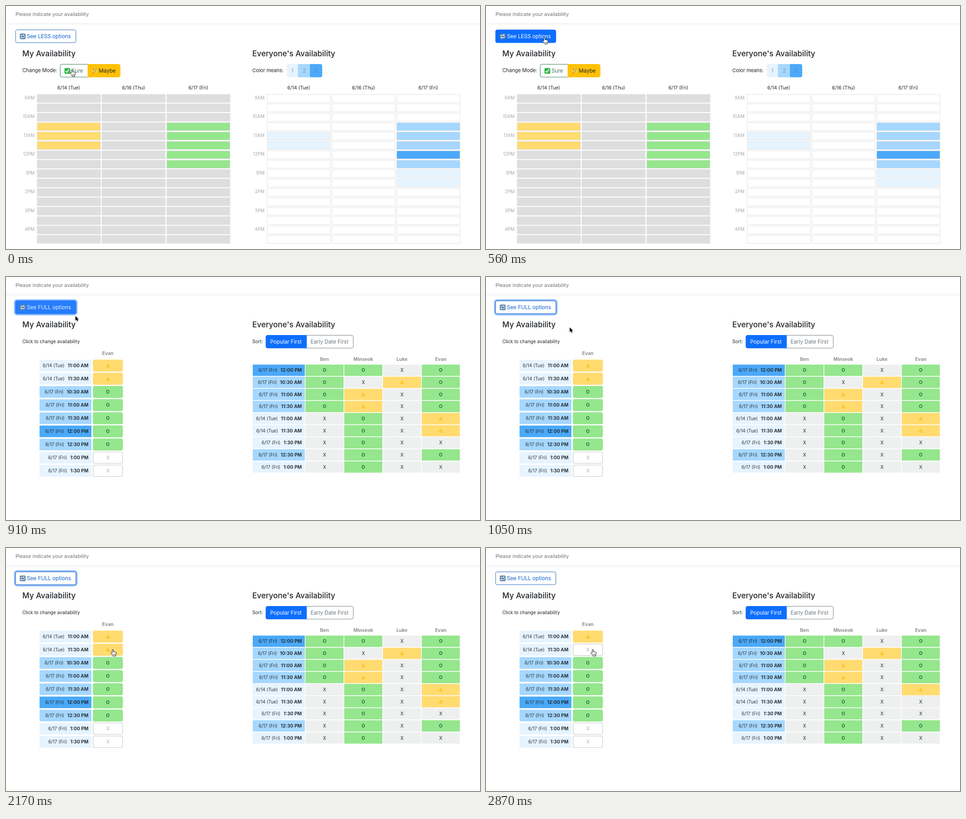
An HTML page that plays this animation: 1045x536 px, repeating every 3080 ms.

```html
<!DOCTYPE html>
<html lang="en">
<head>
<meta charset="utf-8">
<title>Availability</title>
<style>
  html, body { margin: 0; width: 100%; height: 100%; overflow: hidden; background: #fff; }
  svg { display: block; width: 100%; height: 100%; }
  text { font-family: Inter, Roboto, sans-serif; font-optical-sizing: none; fill: #212529; white-space: pre; }
  .mid { text-anchor: middle; }
  .end { text-anchor: end; }
  .bold { font-weight: 700; }
</style>
</head>
<body>
<svg id="stage" viewBox="0 0 1045 536"></svg>
<script>
const LOOP = 3080, STEP = 70;
const BLUE = '#0d6efd', YELLOW = '#ffdb70', GREEN = '#95e68d';
const LEVELS = ['#fff', '#e6f4ff', '#a5d7ff', '#4ba9f9'];
const DAYS = ['6/14 (Tue)', '6/16 (Thu)', '6/17 (Fri)'];
const ME = 'Evan', PEOPLE = ['Ben', 'Minseok', 'Luke', ME];

const rect = (x, y, w, h, fill, extra = '') =>
  `<rect x="${x}" y="${y}" width="${w}" height="${h}" fill="${fill}" ${extra}/>`;
const text = (x, y, size, content, extra = '') =>
  `<text x="${x}" y="${y}" font-size="${size}" ${extra}>${content}</text>`;
const group = (id, content) => `<g id="${id}">${content}</g>`;
const times = (n, make) => Array.from({ length: n }, (_, i) => make(i)).join('');

// Button half: rounded on the left or on the right only.
function halfButton(x, w, side, fill, stroke) {
  const y = 128.6, h = 28.2, r = 3.5;
  const d = side === 'left'
    ? `M${x + w} ${y}H${x + r}q${-r} 0 ${-r} ${r}v${h - 2 * r}q0 ${r} ${r} ${r}H${x + w}Z`
    : `M${x} ${y}H${x + w - r}q${r} 0 ${r} ${r}v${h - 2 * r}q0 ${r} ${-r} ${r}H${x}Z`;
  return `<path d="${d}" fill="${fill}" stroke="${stroke}"/>`;
}

const checkIcon = rect(129, 136.8, 12.6, 12.6, '#2fb344', 'rx="2.2"') +
  '<path d="M131.7 143.4l2.6 2.9 4.6-7" fill="none" stroke="#fff" stroke-width="1.8"/>';
const thinkingIcon = `<circle cx="195.5" cy="142.8" r="6" fill="#fdcf48"/>
  <circle cx="193.3" cy="141.2" r=".9" fill="#6b4514"/><circle cx="197.9" cy="141.2" r=".9" fill="#6b4514"/>
  <path d="M191.7 138.9q1.5-.9 2.7-.2M196.6 138.2q1.7-1 3 .3M194 145.4q2-1 4-.4" fill="none" stroke="#6b4514" stroke-width=".8"/>
  <path d="M190.8 149.2q-.6-3 1.6-3.4l4.2-.5q.8.8-2 1.4 1.6 2.7-1 3Z" fill="#ef9c1c"/>`;
const repeatIcon = rect(30.5, 60.8, 12.6, 12.4, '#587fa5', 'rx="2.4"') +
  `<path d="M32.9 67v-1q0-1.7 1.7-1.7h4.6M40.7 67v1q0 1.7-1.7 1.7h-4.6" fill="none" stroke="#fff" stroke-width="1.3"/>
   <path d="M38.4 62.2l3 2.1-3 2.1ZM35.2 67.6l-3 2.1 3 2.1Z" fill="#fff"/>`;

// Calendar grid; shade(col, row) gives the fill of a slot.
function grid(left, stroke, shade) {
  const hours = ['9AM', '10AM', '11AM', '12PM', '1PM', '2PM', '3PM', '4PM'];
  return DAYS.map((day, col) => {
    const x = left + 142.8 * col;
    return text(x + 70.2, 183.7, 10.5, day, 'class="mid"') + times(16, row =>
      rect(x + .5, 195 + 20.72 * row, 139.6, 17.8, shade(col, row), `stroke="${stroke}"`));
  }).join('') + hours.map((hour, i) =>
    text(left - 5.3, 205.8 + 41.45 * i, 9.9, hour, 'class="end" style="fill:#a8a8a8"')).join('');
}

function myShade(col, row) {
  if (col === 0 && row >= 3 && row <= 5) return YELLOW;
  if (col === 2 && row >= 3 && row <= 7) return GREEN;
  return '#dedede';
}

function everyoneShade(col, row) {
  if (col === 0) return LEVELS[row === 4 || row === 5 ? 1 : 0];
  return LEVELS[col === 2 ? +('0002223211'[row] || 0) : 0];
}

const fullView =
  text(36, 146, 11.1, 'Change Mode:') +
  halfButton(119.5, 61, 'left', '#fff', '#39795c') + checkIcon +
  text(144.6, 147.2, 11.6, 'Sure', 'style="fill:#45735e"') +
  halfButton(180.5, 71.2, 'right', '#ffc107', '#ffc107') + thinkingIcon +
  text(204.6, 147.2, 11.6, 'Maybe') +
  text(543, 146, 11, 'Color means:') +
  halfButton(619.7, 24.5, 'left', LEVELS[1], LEVELS[1]) +
  halfButton(670.5, 26.2, 'right', LEVELS[3], LEVELS[3]) +
  rect(643.7, 128.1, 26.5, 29.2, LEVELS[2]) +
  [1, 2, 3].map((n, i) =>
    text(631.4 + 26.1 * i, 147.2, 11.6, n, 'class="mid" style="fill:#6c757d" opacity=".7"')).join('') +
  grid(68.2, '#e0e0e0', myShade) + grid(575.2, '#e2e2e2', everyoneShade);

// One answer: O (yes), T (maybe) or X (no).
function mark(kind, cx, cy, noColor) {
  if (kind === 'T')
    return `<path d="M${cx} ${cy - 2.8}l3 5.8h-6Z" fill="none" stroke="#fbb905" stroke-width="1.3"/>`;
  const color = kind === 'O' ? '#16783f' : noColor;
  return text(cx, cy + 3.7, 10.2, kind, `class="mid bold" style="fill:${color}"`);
}

function slotLabel(x, w, cy, h, slot, level) {
  const [day, time] = slot;
  return rect(x, cy - h / 2, w, h, LEVELS[level]) +
    text(x + w - 6.6, cy + 3.7, 10, `${DAYS[day]}<tspan dx="7" class="bold" font-size="10.3">${time}</tspan>`,
      'class="end" opacity=".92"');
}

function myCell(kind, row) {
  const cy = 195.5 + 29 * row;
  const fill = { O: GREEN, T: YELLOW, X: '#fff' }[kind];
  const stroke = kind === 'X' ? '#d2d2d2' : fill;
  return rect(192.2, cy - 12.6, 64.8, 25.2, fill, `rx="3" stroke="${stroke}" stroke-width="1.4"`) +
    mark(kind, 224.4, cy, '#c6c6c6');
}

function everyoneCell(kind, row, col) {
  const x = 660.2 + 85.45 * col, cy = 205.7 + 26.67 * row;
  const fill = { O: GREEN, T: YELLOW, X: '#eef0f0' }[kind];
  return rect(x, cy - 12.5, 84, 25, fill) + mark(kind, x + 42, cy, '#686868');
}

const name = (x, y, value) => text(x, y, 10.4, value, 'class="mid bold" style="fill:#8d9093"');

const mySlots = [
  [0, '11:00 AM', 1, 'T'], [0, '11:30 AM', 1, 'T'], [2, '10:30 AM', 2, 'O'],
  [2, '11:00 AM', 2, 'O'], [2, '11:30 AM', 2, 'O'], [2, '12:00 PM', 3, 'O'],
  [2, '12:30 PM', 2, 'O'], [2, '1:00 PM', 1, 'X'], [2, '1:30 PM', 1, 'X']
];
const everyoneSlots = [
  [2, '12:00 PM', 3, 'OOXO'], [2, '10:30 AM', 2, 'OXTO'], [2, '11:00 AM', 2, 'OTXO'],
  [2, '11:30 AM', 2, 'OTXO'], [0, '11:00 AM', 1, 'XOXT'], [0, '11:30 AM', 1, 'XOXT'],
  [2, '1:30 PM', 1, 'XOXX'], [2, '12:30 PM', 2, 'XOXO'], [2, '1:00 PM', 1, 'XOXX']
];

const lessView =
  text(36, 146.3, 10.1, 'Click to change availability') +
  text(543, 146, 10.3, 'Sort:') +
  halfButton(662.5, 103, 'right', '#fff', '#7b8288') +
  halfButton(573, 89.5, 'left', BLUE, BLUE) +
  text(582.5, 147.2, 11.65, 'Popular First', 'style="fill:#fff"') +
  text(671.5, 147.2, 11.65, 'Early Date First', 'style="fill:#6c757d"') +
  name(224.5, 172, ME) +
  mySlots.map((slot, row) =>
    slotLabel(74, 114.5, 195.5 + 29 * row, 25.6, slot, slot[2]) + myCell(slot[3], row)).join('') +
  group('myChange', myCell('X', 1)) +
  PEOPLE.map((person, col) => name(702.2 + 85.45 * col, 184.8, person)).join('') +
  everyoneSlots.map((slot, row) =>
    slotLabel(544, 114.8, 205.7 + 26.67 * row, 25, slot, slot[2]) +
    [...slot[3]].map((kind, col) => everyoneCell(kind, row, col)).join('')).join('') +
  group('everyoneChange', everyoneCell('X', 5, 3));

const toggleButton =
  rect(0, 0, 0, 0, BLUE, 'id="ring"') +
  rect(21.2, 52.7, 132.8, 28.2, '#fff', 'id="toggle" rx="3.5"') +
  repeatIcon + text(46, 71.3, 11.7, '', 'id="toggleText"');

// Each cursor has its hot spot at 0,0.
const cursors = {
  hand: `<path d="M-1.4 7.6V1.1a1.3 1.3 0 0 1 2.6 0V5.2a1.2 1.2 0 0 1 2.2.4 1.2 1.2 0 0 1 2.2.5 1.1 1.1 0 0 1 1.9.8V9.7L6.2 12V14.3H.2V12.9L-3.9 8.6a1.2 1.2 0 0 1 1.8-1.6Z" fill="#fff" stroke="#111" stroke-linejoin="round"/>
    <path d="M1.4 9.2v3M3.2 9.2v3M5 9.2v3" stroke="#333" stroke-width=".7"/>`,
  arrow: '<path d="M0 0V10.6L2.5 8.3 4.2 12 6 11.2 4.4 7.6H7.6Z" fill="#000" stroke="#fff" stroke-width=".9" paint-order="stroke"/>',
  beam: '<path d="M-2.6-6Q0-6 0-4.4 0-6 2.6-6M0-4.6V4.6M-2.6 6Q0 6 0 4.4 0 6 2.6 6M-1.3 2.4H1.3" fill="none" stroke="#111" stroke-width="1.2"/>'
};

// Time, x, y and shape of the pointer.
const path = [
  [0, 145.5, 140.5, 'hand'], [70, 145, 134, 'hand'], [140, 141, 117, 'arrow'], [210, 137, 97, 'beam'],
  [280, 133, 72, 'hand'], [350, 130, 51, 'hand'], [420, 128, 47, 'hand'], [490, 128, 62, 'hand'],
  [560, 129, 69.5, 'hand'], [770, 129, 69.5, 'hand'], [840, 138, 76, 'hand'], [910, 153, 86, 'arrow'],
  [1050, 184.5, 111, 'arrow'], [1120, 194, 123, 'arrow'], [1330, 212, 146, 'arrow'], [1470, 224, 161, 'beam'],
  [1540, 228, 168, 'beam'], [1610, 230, 182, 'hand'], [1680, 232.5, 191, 'hand'], [1890, 238, 210, 'hand'],
  [2030, 238, 221, 'hand'], [2170, 235.5, 224, 'hand'], [LOOP, 235.5, 224, 'hand']
];

document.getElementById('stage').innerHTML =
  text(21, 21.8, 10.95, 'Please indicate your availability', 'style="fill:#6c6f72"') +
  rect(0, 39, 1045, 1, '#e2e4e6') + toggleButton +
  text(36, 111.2, 17, 'My Availability', 'font-weight="500"') +
  text(543, 111.2, 17, 'Everyone\'s Availability', 'font-weight="500"') +
  group('fullView', fullView) + group('lessView', lessView) +
  group('pointer', Object.entries(cursors).map(([id, shape]) => group(id, shape)).join(''));

const el = id => document.getElementById(id);
const set = (id, attributes) => {
  for (const key in attributes) el(id).setAttribute(key, attributes[key]);
};
const show = (id, visible) => set(id, { display: visible ? 'inline' : 'none' });
const ramp = (t, start) => {
  const p = Math.min(1, Math.max(0, (t - start) / 150));
  return p * p * (3 - 2 * p);
};
const mix = (from, to, p) => `rgb(${from.map((v, i) => Math.round(v + (to[i] - v) * p))})`;

function draw(t) {
  const less = t >= 630;
  show('fullView', !less);
  show('lessView', less);
  set('myChange', { opacity: ramp(t, 2620) });
  show('everyoneChange', t >= 2660);

  const hover = ramp(t, 245) - ramp(t, 880);
  const blue = [13, 110, 253];
  set('toggle', { fill: mix([255, 255, 255], blue, hover), stroke: mix([38, 104, 181], blue, hover) });
  el('toggleText').style.fill = mix([11, 99, 206], [255, 255, 255], hover);
  el('toggleText').textContent = `See ${less ? 'FULL' : 'LESS'} options`;

  const focus = ramp(t, 520) - ramp(t, 2630), spread = 3 * focus;
  set('ring', {
    x: 20.7 - spread, y: 52.2 - spread, width: 133.8 + 2 * spread, height: 29.2 + 2 * spread,
    rx: 4 + spread, opacity: .5 * focus
  });

  const next = path.findIndex(key => key[0] > t);
  const [t0, x0, y0, shape] = path[next - 1], [t1, x1, y1] = path[next];
  const p = (t - t0) / (t1 - t0);
  set('pointer', { transform: `translate(${x0 + (x1 - x0) * p} ${y0 + (y1 - y0) * p})` });
  for (const id in cursors) show(id, id === shape);
}

const start = performance.now();
function tick() {
  const t = (performance.now() - start) % LOOP;
  draw(Math.floor(t / STEP) * STEP);
  requestAnimationFrame(tick);
}
tick();
</script>
</body>
</html>
```
